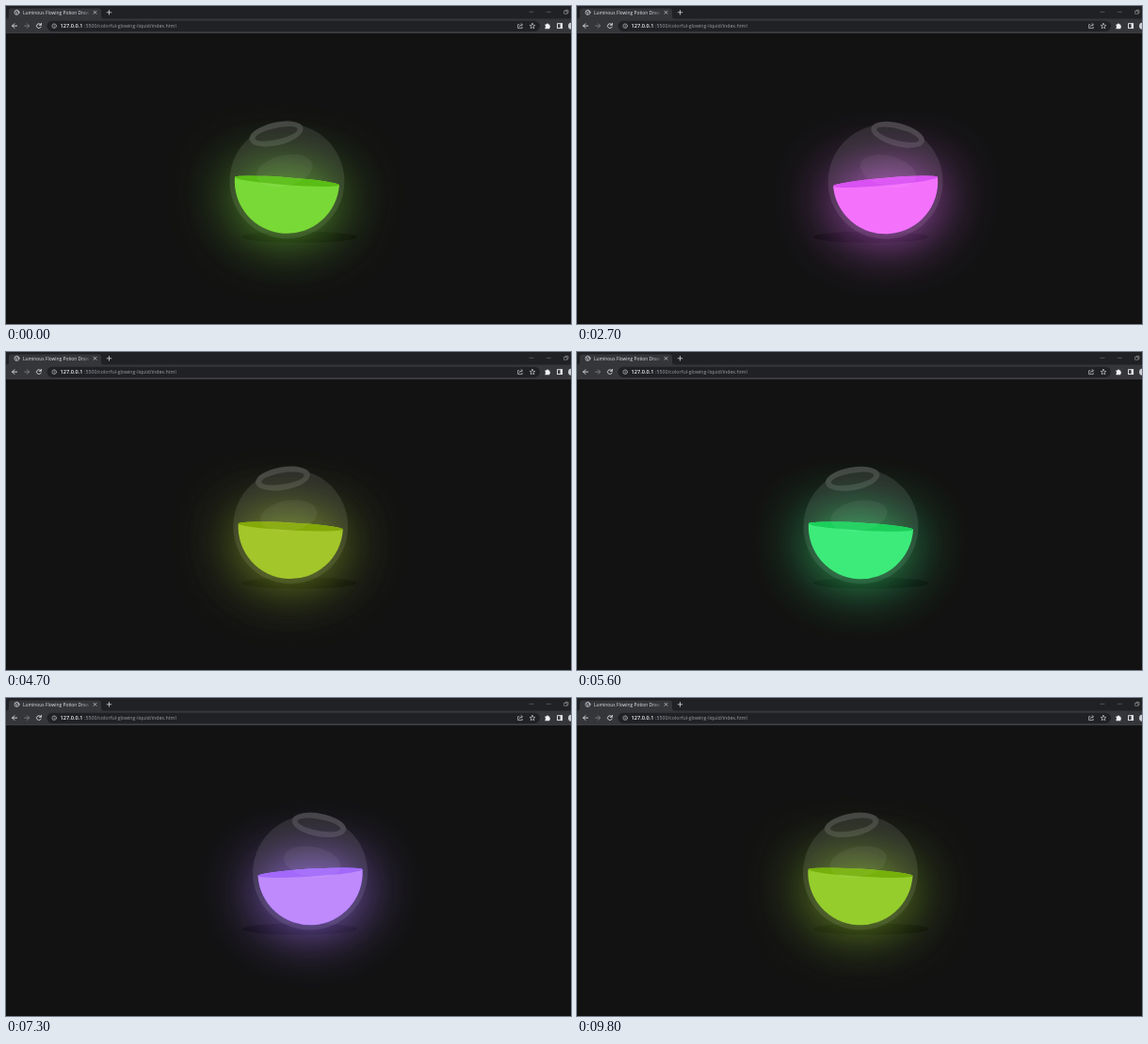
These frames come from a looping animation (600x338 px, 9.9 s). An HTML page with a canvas:

```html
<!DOCTYPE html>
<html lang="en">
<head>
<meta charset="utf-8">
<title>Glowing flask</title>
<style>
  html, body { margin: 0; width: 100%; height: 100%; overflow: hidden; background: #121212; }
  canvas, .browser { position: absolute; left: 0; top: 0; display: block; }
  .browser text { font-family: "Open Sans", "Noto Sans", sans-serif; }
</style>
</head>
<body>
<canvas id="scene" width="600" height="338"></canvas>

<svg class="browser" width="600" height="338" viewBox="0 0 600 338" fill="none" stroke-linecap="round">
  <defs>
    <filter id="grade" color-interpolation-filters="sRGB" x="0" y="0" width="1" height="1">
      <feColorMatrix values=".9136 .0785 .0079 0 0  -.1051 1.1722 -.0671 0 0  .0096 .0322 .9582 0 0  0 0 0 1 0"/>
    </filter>
    <linearGradient id="fade" gradientUnits="userSpaceOnUse" x1="81" y1="0" x2="89" y2="0">
      <stop stop-color="#dee1e6"/><stop offset="1" stop-color="#dee1e6" stop-opacity="0"/>
    </linearGradient>
  </defs>

  <!-- tab strip and toolbar -->
  <path d="M0 0H600V14H0Z" fill="#202124"/>
  <path d="M0 13.5Q3 13.5 3 10.5V5.5Q3 2.5 6 2.5H98Q101 2.5 101 5.5V10.5Q101 13.5 104 13.5H600V29H0Z" fill="#35363a"/>
  <path d="M0 28.7H600" stroke="#47484c" stroke-width=".5"/>
  <rect x="43.5" y="15.7" width="523.5" height="11.2" rx="5.6" fill="#202124"/>

  <!-- tab -->
  <circle cx="11.5" cy="6.8" r="2.5" stroke="#c4c7cc" stroke-width=".8"/>
  <path d="M9.6 5.6L11.6 7.2L11 9M11.7 4.6L12.6 6.4L13.8 6.8" stroke="#c4c7cc" stroke-width=".8"/>
  <text x="18" y="8.7" font-size="4.9" fill="url(#fade)">Luminous Flowing Potion Drawing</text>
  <path d="M93 5.3L96 8.3M96 5.3L93 8.3" stroke="#d5d7db" stroke-width=".7"/>
  <path d="M107.2 6.8H111.8M109.5 4.5V9.1" stroke="#d5d7db" stroke-width=".8"/>

  <!-- window buttons -->
  <g stroke="#85878b" stroke-width=".5">
    <path d="M556 6.3H560"/>
    <rect x="574.4" y="4.4" width="3.8" height="3.8" stroke="none"/>
    <path d="M574.3 6.3H578.3"/>
    <path d="M593 5.3H596V8.3H593ZM594 5.2V4.3H597V7.3H596.1" stroke="#b4b6ba"/>
  </g>

  <!-- navigation -->
  <g stroke="#dfe1e5" stroke-width=".9">
    <path d="M11.6 21.1H6.7M8.9 18.8L6.6 21.1L8.9 23.4"/>
    <path d="M19.7 21.1H24.6M22.4 18.8L24.7 21.1L22.4 23.4" stroke="#7d7f83"/>
    <path d="M36.9 19.7A2.4 2.4 0 1 0 37.2 22.1M37.4 18.4V20.3H35.5"/>
  </g>

  <!-- address -->
  <circle cx="51.2" cy="21.2" r="2.3" stroke="#b5b8bd" stroke-width=".7"/>
  <path d="M51.2 21V22.3M51.2 19.9V20" stroke="#b5b8bd" stroke-width=".7"/>
  <text x="57.6" y="23.2" font-size="5.6" font-weight="600" fill="#f1f3f4">127.0.0.1</text>
  <text x="83" y="23.2" font-size="5.25" fill="#9aa0a6">:5500/colorful-glowing-liquid/index.html</text>

  <!-- toolbar icons -->
  <g stroke="#c4c7cc" stroke-width=".7">
    <path d="M544.8 19.7H543.6V23.6H548.2V22.4M545 22Q545.4 19.9 548 19.9M547 18.6L548.5 19.9L547 21.2"/>
    <path d="M559 18.4L559.8 20.3L561.9 20.5L560.3 21.8L560.8 23.8L559 22.7L557.2 23.8L557.7 21.8L556.1 20.5L558.2 20.3Z" stroke-linejoin="round"/>
  </g>
  <path d="M572.5 19.5H574A1 1 0 0 1 576 19.5H577.3V21A1 1 0 0 1 577.3 22.9V24.2H572.5V22.8A1 1 0 0 0 572.5 21Z" fill="#f1f3f4"/>
  <rect x="585.6" y="18.7" width="5" height="4.9" stroke="#f1f3f4" stroke-width=".9"/>
  <path d="M588.6 18.7H590.6V23.6H588.6Z" fill="#f1f3f4"/>
  <circle cx="600.6" cy="21.2" r="3.6" fill="#c9cdd3"/>
</svg>

<script>
const canvas = document.getElementById('scene');
const ctx = canvas.getContext('2d');

const LOOP = 9900, STEP = 100;      // ms
const SWING = 5, START = 1.43;      // s
const SCALE = 0.40625;              // page pixels to stage pixels
const PIVOT = { x: 312, y: 245.6 };
const LIQUID = '#41c1fb', SURFACE = '#1fa4e0';

const rad = deg => deg * Math.PI / 180;

// Linear swing 0, 1, 0, -1, 0 over one cycle
const triangle = p => p < 0.25 ? 4 * p : p < 0.75 ? 2 - 4 * p : 4 * p - 4;

function oval(x, y, w, h, fill) {
  ctx.beginPath();
  ctx.ellipse(x, y, w / 2, h / 2, 0, 0, 2 * Math.PI);
  ctx.fillStyle = fill;
  ctx.fill();
}

function drawNeck() {
  ctx.beginPath();
  ctx.ellipse(0, -127, 71.8, 30, 0, 0, 2 * Math.PI);
  ctx.ellipse(0, -127, 56.8, 15, 0, 0, 2 * Math.PI);
  ctx.fillStyle = '#444';
  ctx.fill('evenodd');
}

function drawLiquid(angle) {
  ctx.save();
  ctx.rotate(rad(angle));
  ctx.shadowColor = LIQUID;
  ctx.shadowBlur = 160 * SCALE;
  ctx.beginPath();
  ctx.arc(0, 0, 137, 0, Math.PI);
  ctx.ellipse(0, 0, 137, 10, 0, Math.PI, 2 * Math.PI);
  ctx.fillStyle = LIQUID;
  ctx.fill();
  ctx.shadowColor = 'transparent';
  oval(0, 0, 274, 20, SURFACE);
  ctx.restore();
}

function draw(seconds) {
  const phase = ((seconds - START) / SWING % 1 + 1) % 1;
  const swing = triangle(phase);

  ctx.fillStyle = '#121212';
  ctx.fillRect(0, 0, 600, 338);

  ctx.save();
  ctx.translate(PIVOT.x, PIVOT.y);
  ctx.scale(SCALE, SCALE);
  oval(0, 0, 300, 30, 'rgba(0,0,0,.5)');

  ctx.rotate(rad(15 * swing));
  ctx.translate(0, -150);
  oval(0, 0, 300, 300, 'rgba(255,255,255,.1)');
  drawNeck();
  drawLiquid(-20 * swing);
  oval(0, -28.4, 150, 80, 'rgba(255,255,255,.05)');
  ctx.restore();

  canvas.style.filter = `hue-rotate(${360 * phase}deg) url(#grade)`;
}

function tick() {
  const ms = performance.now() % LOOP;
  draw(Math.floor(ms / STEP) * STEP / 1000);
  requestAnimationFrame(tick);
}
tick();
</script>
</body>
</html>
```
